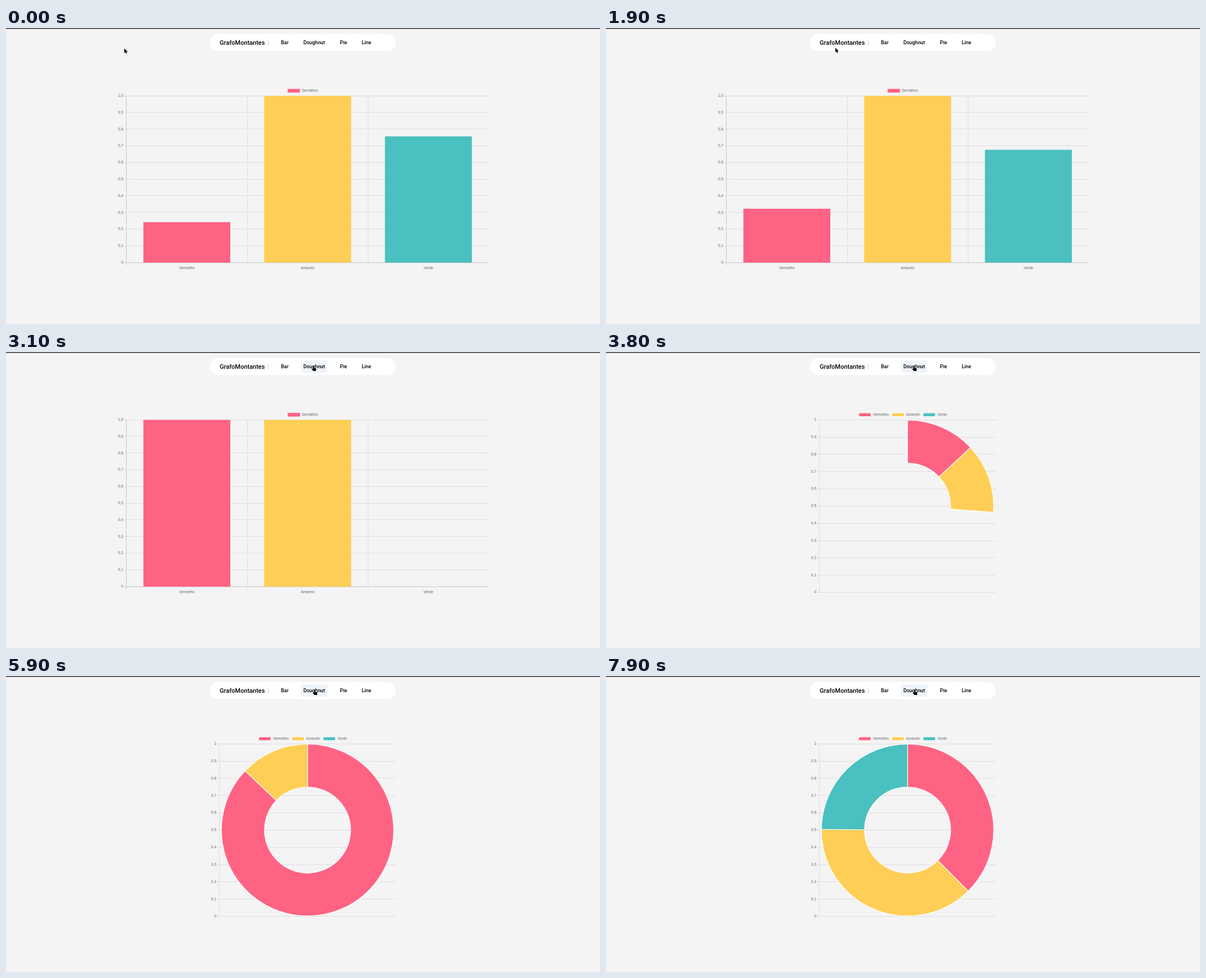
Write an HTML page that moves like this. It is 1059 by 529 pixels and loops after 8 s.

```html
<!DOCTYPE html>
<html lang="pt">
<head>
<meta charset="utf-8">
<title>Gráficos</title>
<style>
  html, body { margin: 0; width: 100%; height: 100%; overflow: hidden; background: #f4f4f4; }
  svg { display: block; width: 1059px; height: 529px; }
  .nav { font: 500 8.83px Roboto, sans-serif; fill: #000; }
  .chart { font: 6.62px "Liberation Sans", Arial, sans-serif; fill: #666; }
  .brand { font-size: 11.03px; }
  .cursor { fill: #000; stroke: #fff; stroke-width: .6; paint-order: stroke; }
</style>
</head>
<body>
<svg viewBox="0 0 1059 529">
  <rect width="1059" height="1.6" fill="#3d3d40"/>
  <rect x="363.3" y="11" width="331.7" height="30.3" rx="15.1" fill="#fff"/>
  <rect id="hover" x="526" y="15" width="47.2" height="22" rx="3.3" fill="#eff3fa"/>
  <path d="M467.7 22V30.5" stroke="#c4c4c4" stroke-width=".8"/>
  <g class="nav">
    <text class="brand" x="381" y="29.9">GrafoMontantes</text>
    <text x="490.3" y="29.4">Bar</text>
    <text x="530.3" y="29.4">Doughnut</text>
    <text x="595.3" y="29.4">Pie</text>
    <text x="634.3" y="29.4">Line</text>
  </g>
  <g id="barPage" class="chart"></g>
  <g id="ringPage" class="chart"></g>
  <path id="arrow" class="cursor" d="M0 0V8.6L2 6.8L3.2 9.5L4.6 8.9L3.4 6.2H6.1Z"/>
  <path id="hand" class="cursor" d="M-.7 5.5V1.1a.8.8 0 0 1 1.6 0V4l3 .6a1.2 1.2 0 0 1 1 1.2V7.5L4.3 9.8H0L-2.8 6.8a.7.7 0 0 1 1-1z"/>
</svg>
<script>
const LOOP = 8000, STEP = 100, PAGE_SWITCH = 3700;
const NAMES = ['Vermelho', 'Amarelo', 'Verde'];
const COLORS = ['#ff6384', '#ffce56', '#4bc0c0'];
const GRID = '#dedede', ZERO = '#c6c6c6';
const $ = id => document.getElementById(id);

// Each entry starts a one second tween from the current values.
const BAR_DATA = [[-198, [0, 1, 1]], [1807, [1, 1, 0]]];
const RING_DATA = [
  [3727, [.5, .5, 0]], [3810, [1, 0, 0]], [5828, [.5, .5, 0]], [7831, [0, 0, 1]]
];
// Pointer stops: time, x, y
const POINTER = [
  [200, 210.9, 36.5], [800, 213.4, 36.9], [1300, 213.4, 36.9], [1400, 213.7, 37.3],
  [2200, 499.3, 34.3], [3100, 548, 24.3], [3200, 549, 24.3], [5100, 549, 24.3], [5200, 550, 24.3]
];

const clamp = v => Math.max(0, Math.min(1, v));
const mix = (a, b, p) => a + (b - a) * p;
const easeOutQuart = p => 1 - (1 - clamp(p)) ** 4;

const line = (x1, y1, x2, y2, color = GRID) =>
  `<path d="M${x1} ${y1}L${x2} ${y2}" stroke="${color}"/>`;
const label = (x, y, text, anchor = 'start') =>
  `<text x="${x}" y="${y}" text-anchor="${anchor}">${text}</text>`;
const swatch = (x, color, border = 'none') =>
  `<rect x="${x}" y="108.8" width="22" height="6.6" fill="${color}" stroke="${border}" stroke-width="1.1"/>`;

function rows(left, right, top, gap, format, zero) {
  let out = '';
  for (let i = 0; i <= 10; i++) {
    const y = Math.floor(top + gap * i) + .5;
    out += line(left - 5, y, right, y, i === 10 ? zero : GRID);
    out += label(left - 5.5, top + gap * i + 1.9, format(10 - i), 'end');
  }
  return out;
}

function buildBars() {
  const comma = n => n ? (n / 10).toFixed(1).replace('.', ',') : '0';
  let out = rows(214.5, 861, 121, 29.8, comma, ZERO);
  [214.5, 430.5, 645.5].forEach((x, i) => out += line(x, 121, x, 424, i ? GRID : ZERO));
  NAMES.forEach((name, i) => {
    const mid = 322.4 + 215.35 * i;
    out += label(mid, 431.2, name, 'middle');
    out += `<rect class="bar" x="${mid - 77.5}" width="155" fill="${COLORS[i]}"/>`;
  });
  $('barPage').innerHTML = out + swatch(502.2, COLORS[0]) + label(527.6, 114.2, 'Semáforo');
}

function buildRing() {
  let out = rows(380.5, 695, 121.3, 30.82, n => n / 10, GRID) + line(380.5, 121, 380.5, 429);
  [450.5, 509.7, 565.3].forEach((x, i) => {
    out += swatch(x, COLORS[i], '#fff') + label(x + 25.4, 114.2, NAMES[i]);
  });
  COLORS.forEach(c => out += `<path class="arc" fill="${c}" stroke="#fff" stroke-width="1.1"/>`);
  $('ringPage').innerHTML = out;
}

function valuesAt(time, values, steps) {
  steps.forEach(([start, target], i) => {
    if (time < start) return;
    const end = i + 1 < steps.length ? Math.min(time, steps[i + 1][0]) : time;
    const p = easeOutQuart((end - start) / 1000);
    values = values.map((v, j) => mix(v, target[j], p));
  });
  return values;
}

function pointerAt(time) {
  let i = 0;
  while (i < POINTER.length - 2 && time >= POINTER[i + 1][0]) i++;
  const [t0, x0, y0] = POINTER[i], [t1, x1, y1] = POINTER[i + 1];
  const p = clamp((time - t0) / (t1 - t0)), s = p * p * (3 - 2 * p);
  return [mix(x0, x1, s), mix(y0, y1, s)];
}

function arcPath(from, size) {
  const sweep = Math.min(size, .99999), large = +(sweep > .5);
  const at = (turn, r) => {
    const a = turn * 2 * Math.PI;
    return `${537.6 + r * Math.sin(a)} ${275.3 - r * Math.cos(a)}`;
  };
  const to = from + sweep, R = 153.5, r = 76.8;
  return `M${at(from, R)}A${R} ${R} 0 ${large} 1 ${at(to, R)}` +
         `L${at(to, r)}A${r} ${r} 0 ${large} 0 ${at(from, r)}Z`;
}

buildBars();
buildRing();
const bars = document.querySelectorAll('.bar'), arcs = document.querySelectorAll('.arc');
const show = (el, on) => el.style.display = on ? '' : 'none';

function draw(time) {
  const ringOn = time >= PAGE_SWITCH;
  show($('barPage'), !ringOn);
  show($('ringPage'), ringOn);

  if (ringOn) {
    let from = 0;
    const parts = valuesAt(time, [0, 0, 0], RING_DATA);
    parts.forEach((size, i) => {
      show(arcs[i], time > RING_DATA[0][0]);
      arcs[i].setAttribute('d', arcPath(from, size));
      from += size;
    });
  } else {
    valuesAt(time, [1, 1, 0], BAR_DATA).forEach((v, i) => {
      bars[i].setAttribute('y', 419.3 - 298 * v);
      bars[i].setAttribute('height', 298 * v);
    });
  }

  const [x, y] = pointerAt(time), over = x >= 526;
  show($('hover'), over);
  show($('arrow'), !over);
  show($('hand'), over);
  $(over ? 'hand' : 'arrow').setAttribute('transform', `translate(${x} ${y})`);
}

const start = performance.now();
function tick() {
  const time = (performance.now() - start) % LOOP;
  draw(Math.max(STEP, Math.floor(time / STEP) * STEP));
  requestAnimationFrame(tick);
}
tick();
</script>
</body>
</html>
```
